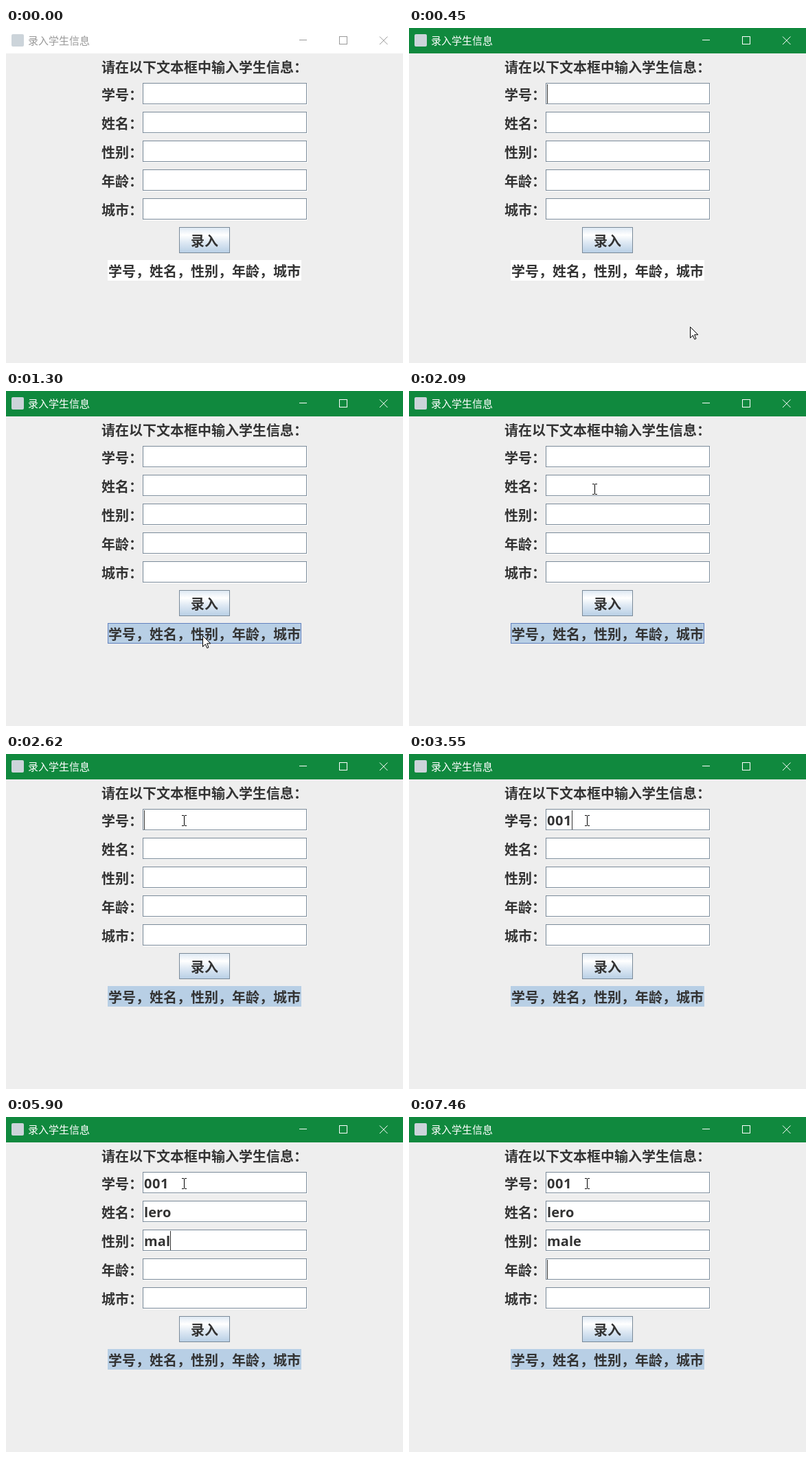
These frames come from a looping animation (578x488 px, 7.99 s). An HTML page:

```html
<!DOCTYPE html>
<html lang="zh-CN">
<head>
<meta charset="utf-8">
<title>录入学生信息</title>
<style>
  html, body { margin: 0; width: 100%; height: 100%; overflow: hidden; background: #eee; }
  svg { display: block; }
  text { white-space: pre; }
  .bold { font: bold 20px "Noto Sans CJK SC", "Noto Sans CJK", sans-serif; fill: #333; }
  .typed { font: bold 20px "Open Sans", "Noto Sans", sans-serif; fill: #333; letter-spacing: .1px; }
  .digits { letter-spacing: .57px; }
  .caption { font: 15px "Noto Sans CJK SC", "Noto Sans CJK", sans-serif; }
  .crisp { shape-rendering: crispEdges; }
</style>
</head>
<body>
<svg id="stage" width="578" height="488" viewBox="0 0 578 488">
  <defs>
    <linearGradient id="face" x1="0" y1="0" x2="0" y2="1">
      <stop offset="0" stop-color="#dde8f3"/>
      <stop offset=".3" stop-color="#fff"/>
      <stop offset=".6" stop-color="#dde8f3"/>
      <stop offset="1" stop-color="#b8cfe5"/>
    </linearGradient>
  </defs>
  <rect width="578" height="488" fill="#eee"/>

  <rect id="bar" width="578" height="37"/>
  <rect x="8" y="9" width="18" height="18" rx="2" fill="#ccd4da"/>
  <text id="caption" class="caption" x="32" y="24">录入学生信息</text>
  <g id="controls" fill="none">
    <path class="crisp" d="M427 17.5h11M485.5 12.5h11v11h-11z"/>
    <path d="M544 12.5l11.5 11.5M555.5 12.5l-11.5 11.5"/>
  </g>

  <text class="bold" x="139" y="65">请在以下文本框中输入学生信息：</text>
  <g id="rows"></g>

  <rect class="crisp" x="252.5" y="290.5" width="73" height="37" fill="url(#face)" stroke="#7a8a99"/>
  <text class="bold" x="269" y="318">录入</text>

  <rect id="item" class="crisp" x="148.5" y="338.5" width="281" height="29"/>
  <text class="bold" x="149" y="362">学号，姓名，性别，年龄，城市</text>

  <rect id="caret" class="crisp" width="1" height="28" fill="#333"/>
  <path id="arrow" fill="#fff" stroke="#000" stroke-linejoin="miter"
    d="M.5 .5V16.5L4.3 12.8L6.8 18.5L9 17.5L6.6 11.8H11.8Z"/>
  <path id="beam" class="crisp" fill="none" stroke="#000"
    d="M-3 .5h3M1 .5h3M.5 1v14M-3 15.5h3M1 15.5h3"/>
</svg>
<script>
const LOOP = 7990;
const $ = id => document.getElementById(id);
const rowTop = i => 80 + 42 * i;

// [time, x, y, shape]; the pointer holds each place until the next one
const pointer = [
  [0, 0, 0, ''],
  [300, 455, 467, 'arrow'], [370, 427, 448, 'arrow'], [450, 409, 435, 'arrow'],
  [520, 402, 424, 'arrow'], [600, 394, 408, 'arrow'], [680, 385, 390, 'arrow'],
  [760, 375, 371, 'arrow'], [830, 366, 357, 'arrow'], [910, 362, 351, 'arrow'],
  [1150, 334, 353, 'arrow'], [1230, 299, 356, 'arrow'], [1300, 286, 356, 'arrow'],
  [1380, 297, 355, 'arrow'], [1450, 325, 353, 'arrow'], [1530, 344, 352, 'arrow'],
  [1760, 337, 334, 'arrow'], [1840, 320, 284, 'arrow'], [1920, 298, 216, 'beam'],
  [2000, 282, 172, 'beam'], [2090, 270, 135, 'beam'], [2160, 264, 114, 'arrow'],
  [2240, 260, 97, 'beam'], [2310, 259, 91, 'beam'], [2390, 259, 89, 'beam']
];

// [time, row holding the caret, or -1 for none]
const carets = [
  [0, -1], [140, 0], [680, -1], [2540, 0], [3000, -1], [3250, 0],
  [3870, 1], [5110, 2], [6450, 3], [6980, -1], [7460, 3]
];

// text of each row and the time of every key
const fields = [
  { label: '学号：', text: '001', keys: [3250, 3400, 3550], style: 'typed digits' },
  { label: '姓名：', text: 'lero', keys: [4250, 4420, 4570, 4650] },
  { label: '性别：', text: 'male', keys: [5660, 5730, 5900, 6050] },
  { label: '年龄：', text: '', keys: [] },
  { label: '城市：', text: '', keys: [] }
];

function add(tag, attrs, text = '') {
  const el = document.createElementNS('http://www.w3.org/2000/svg', tag);
  for (const k in attrs) el.setAttribute(k, attrs[k]);
  el.textContent = text;
  return $('rows').appendChild(el);
}

fields.forEach((f, i) => {
  const y = rowTop(i);
  add('text', { class: 'bold', x: 139, y: y + 25 }, f.label);
  add('rect', { x: 200, y: y + 1, width: 239, height: 31, fill: '#fff' });
  add('rect', { class: 'crisp', x: 199.5, y: y + .5, width: 238, height: 30, fill: '#fff', stroke: '#7a8a99' });
  f.el = add('text', { class: f.style || 'typed', x: 201, y: y + 24 });
});

const at = (steps, t) => steps.filter(s => s[0] <= t).pop();

function set(id, attrs) {
  for (const k in attrs) $(id).setAttribute(k, attrs[k]);
}

function draw(t) {
  const active = t >= 140;
  const ink = active ? '#fff' : '#999';
  set('bar', { fill: active ? '#10893e' : '#fff' });
  set('caption', { fill: ink });
  set('controls', { stroke: ink });

  const chosen = t >= 980;
  const fill = chosen ? '#b8cfe5' : '#fff';
  set('item', { fill, stroke: chosen && t < 2620 ? '#6382bf' : fill });

  for (const f of fields) {
    const typed = f.text.slice(0, f.keys.filter(k => k <= t).length);
    if (f.el.textContent !== typed) f.el.textContent = typed;
  }

  const row = at(carets, t)[1];
  set('caret', { visibility: row < 0 ? 'hidden' : 'visible' });
  if (row >= 0) {
    const el = fields[row].el;
    const width = el.textContent ? el.getComputedTextLength() : 0;
    set('caret', { x: 201 + Math.round(width), y: rowTop(row) + 2 });
  }

  const [, x, y, shape] = at(pointer, t);
  for (const id of ['arrow', 'beam']) {
    set(id, { transform: `translate(${x} ${y})`, visibility: id === shape ? 'visible' : 'hidden' });
  }
}

const start = performance.now();
function tick() {
  draw((performance.now() - start) % LOOP);
  requestAnimationFrame(tick);
}
tick();
</script>
</body>
</html>
```
